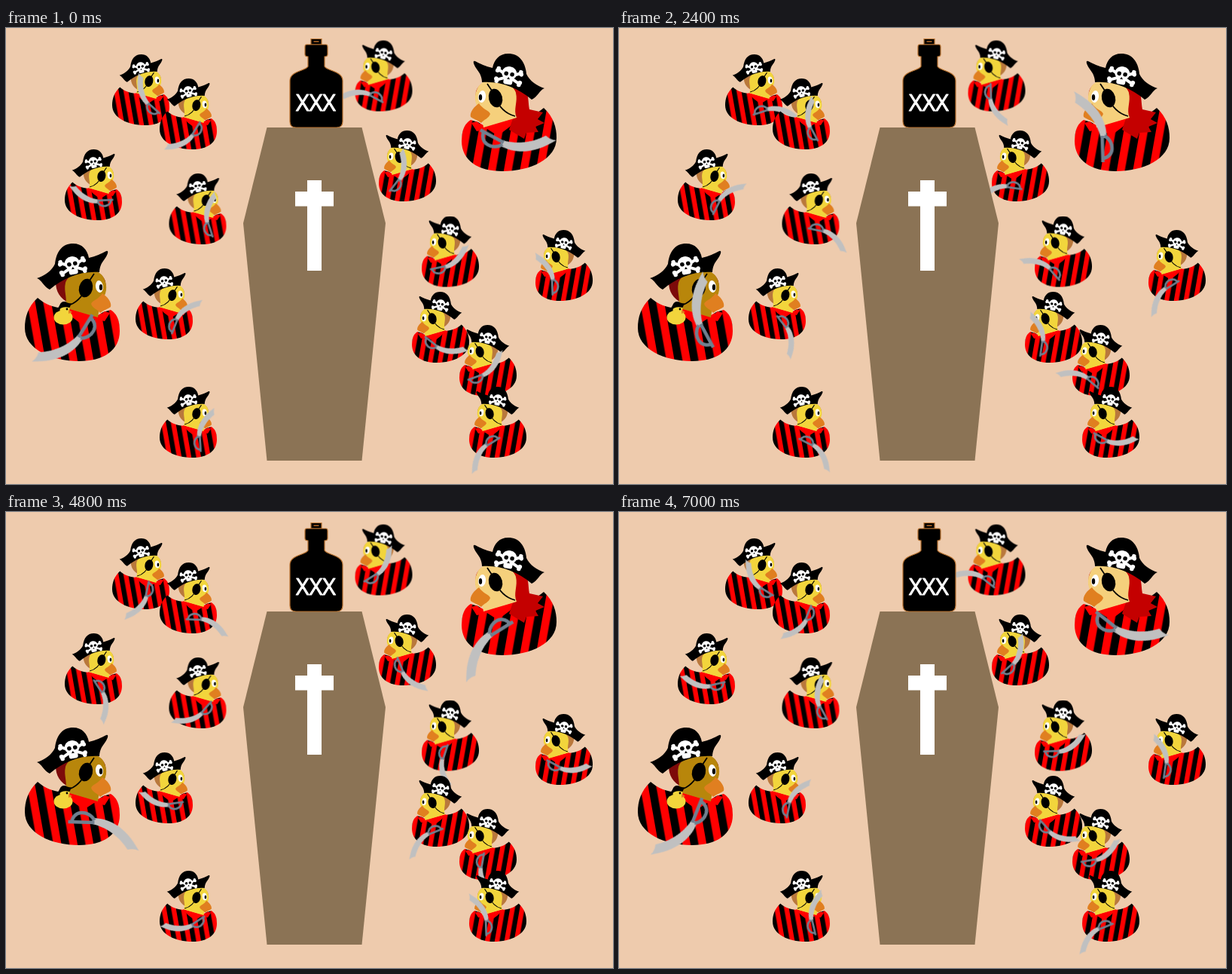
Animation, 806 px wide and 605 px high, one loop 7.2 s. Source, as an HTML page without scripts:

```html
<!DOCTYPE html>
<html lang="en">
<head>
<meta charset="utf-8">
<title>Pirate ducks</title>
<style>
  html, body { margin: 0; width: 100%; height: 100%; overflow: hidden; background: #eecbad; }
  svg { display: block; width: 806px; height: 605px; }
  .crew { --face: #f2d53c; --hair: #b9783c; }
  .mate { --face: #b8860b; --hair: #7d0a0a; }
  .captain { --face: #f5d07c; --hair: #c40000; }
  .face { fill: var(--face); }
  .hair { fill: var(--hair); }
  .spin { animation: spin 7.2s steps(36) infinite; }
  @keyframes spin {
    from { transform: rotate(var(--start)); }
    to { transform: rotate(calc(var(--start) + 360deg)); }
  }
  .label { font: 500 30.5px "Open Sans", "Noto Sans", sans-serif; fill: #fff; stroke: #fff; stroke-linejoin: round; }
</style>
</head>
<body>
<svg viewBox="0 0 806 605">
  <defs>
    <pattern id="stripes" width="21" height="21" patternUnits="userSpaceOnUse" patternTransform="rotate(-10)">
      <rect width="21" height="21" fill="#f00"/>
      <rect width="10.5" height="21"/>
    </pattern>

    <g id="body">
      <path fill="url(#stripes)" d="M17 72C4 84 0 98 0 112C0 140 35 156 72 156C104 156 126 142 126 116C126 98 120 92 114 88L104 91L92 98L52 86C38 85 26 80 17 72Z"/>
      <path fill="#f00" d="M51 84L97 97L106 90L113 92L106 103L92 100L78 109L62 97Z"/>
    </g>

    <g id="head">
      <path class="hair" d="M41 50C40 30 100 26 107 50L108 62L60 80C46 72 41 64 41 50Z"/>
      <path class="face" d="M54 52C60 34 94 28 104 44C111 56 109 68 100 78L97 98L53 85C58 74 51 64 54 52Z"/>
      <path fill="#e07f20" d="M103 66C109 70 116 78 114 84C110 87 105 88 100 92C96 87 90 86 88 80C90 75 98 74 103 66Z"/>
      <ellipse cx="99" cy="57" rx="5" ry="8" fill="#fff" transform="rotate(-8 99 57)"/>
      <ellipse cx="101" cy="58" rx="2.2" ry="4"/>
      <path d="M92 40Q86 48 82 57Q74 78 55 83" fill="none" stroke="#000" stroke-width="1.8"/>
      <ellipse cx="81" cy="59" rx="9" ry="12.5" transform="rotate(14 81 59)"/>
      <path d="M16 46C26 43 36 36 40 27C42 10 50 0 64 0C76 0 83 8 85 19C94 17 102 13 108 10Q111 9 110 13C107 22 100 24 99 38C75 36 52 45 33 61C26 58 22 48 16 46Z"/>
      <g transform="translate(63 28) rotate(-10)">
        <path d="M-14 -4L14 9M-14 9L14 -4" stroke="#fff" stroke-width="4"/>
        <g fill="#fff">
          <circle cx="-15" cy="-6" r="2.8"/><circle cx="-16" cy="-3" r="2.8"/>
          <circle cx="15" cy="-6" r="2.8"/><circle cx="16" cy="-3" r="2.8"/>
          <circle cx="-15" cy="11" r="2.8"/><circle cx="-16" cy="8" r="2.8"/>
          <circle cx="15" cy="11" r="2.8"/><circle cx="16" cy="8" r="2.8"/>
          <ellipse cy="-2" rx="10" ry="9"/>
          <rect x="-6" y="2" width="12" height="11" rx="3"/>
        </g>
        <circle cx="-4" cy="-1" r="2.8"/><circle cx="4" cy="-1" r="2.8"/>
        <path d="M0 3L2 6H-2Z"/>
      </g>
    </g>

    <g id="duck"><use href="#body"/><use href="#head"/></g>

    <g id="sword" transform="rotate(120)">
      <path fill="#c0c0c0" d="M7 1C26 1 50 9 69 44.5Q62 41 54 43C46 30 30 14 7 9Z"/>
      <path fill="none" stroke="#708090" stroke-width="4.5" d="M-25 6L10 7M-20 8C-20 -9 2 -11 10 4"/>
    </g>

    <g id="chick">
      <ellipse cx="51" cy="98" rx="12.5" ry="9.5" fill="#f2d53c"/>
      <circle cx="53" cy="88" r="6.5" fill="#f2d53c"/>
      <path fill="#e07f20" d="M58 88L63 91L58 93Z"/>
      <circle cx="56" cy="87" r="1.4"/>
      <path d="M43 86C47 84 46 77 52 77C56 77 56 80 62 79C60 82 61 84 59 85C53 83 48 85 45 88Z"/>
    </g>
  </defs>

  <rect width="806" height="605" fill="#eecbad"/>

  <g class="mate" transform="translate(25 286)">
    <use href="#duck"/><use href="#chick"/>
    <g transform="translate(82.4 119)"><use class="spin" style="--start:0deg" href="#sword"/></g>
  </g>
  <g class="captain" transform="translate(731 34) scale(-1 1)">
    <use href="#body"/>
    <path class="hair" d="M42 45C36 58 38 66 36 74L18 78L25 87L16 92L28 97L24 104L40 105L43 113L63 101L56 80L60 50Z"/>
    <use href="#head"/>
    <g transform="translate(82.4 119)"><use class="spin" style="--start:30deg" href="#sword"/></g>
  </g>

  <g class="crew">
    <g transform="translate(141 35) scale(.603)">
      <use href="#duck"/>
      <g transform="translate(82.4 119)"><use class="spin" style="--start:100deg" href="#sword"/></g>
    </g>
    <g transform="translate(204 67) scale(.603)">
      <use href="#duck"/>
      <g transform="translate(82.4 119)"><use class="spin" style="--start:0deg" href="#sword"/></g>
    </g>
    <g transform="translate(78 161) scale(.603)">
      <use href="#duck"/>
      <g transform="translate(82.4 119)"><use class="spin" style="--start:55deg" href="#sword"/></g>
    </g>
    <g transform="translate(216.5 193) scale(.603)">
      <use href="#duck"/>
      <g transform="translate(82.4 119)"><use class="spin" style="--start:130deg" href="#sword"/></g>
    </g>
    <g transform="translate(172 319) scale(.603)">
      <use href="#duck"/>
      <g transform="translate(82.4 119)"><use class="spin" style="--start:170deg" href="#sword"/></g>
    </g>
    <g transform="translate(204 476) scale(.603)">
      <use href="#duck"/>
      <g transform="translate(82.4 119)"><use class="spin" style="--start:145deg" href="#sword"/></g>
    </g>

    <g transform="translate(539.5 16.5) scale(-.603 .603)">
      <use href="#duck"/>
      <g transform="translate(82.4 119)"><use class="spin" style="--start:210deg" href="#sword"/></g>
    </g>
    <g transform="translate(571 136) scale(-.603 .603)">
      <use href="#duck"/>
      <g transform="translate(82.4 119)"><use class="spin" style="--start:110deg" href="#sword"/></g>
    </g>
    <g transform="translate(628 249.5) scale(-.603 .603)">
      <use href="#duck"/>
      <g transform="translate(82.4 119)"><use class="spin" style="--start:70deg" href="#sword"/></g>
    </g>
    <g transform="translate(779 268) scale(-.603 .603)">
      <use href="#duck"/>
      <g transform="translate(82.4 119)"><use class="spin" style="--start:150deg" href="#sword"/></g>
    </g>
    <g transform="translate(615 350) scale(-.603 .603)">
      <use href="#duck"/>
      <g transform="translate(82.4 119)"><use class="spin" style="--start:20deg" href="#sword"/></g>
    </g>
    <g transform="translate(678 394) scale(-.603 .603)">
      <use href="#duck"/>
      <g transform="translate(82.4 119)"><use class="spin" style="--start:78deg" href="#sword"/></g>
    </g>
    <g transform="translate(691 476) scale(-.603 .603)">
      <use href="#duck"/>
      <g transform="translate(82.4 119)"><use class="spin" style="--start:270deg" href="#sword"/></g>
    </g>
  </g>

  <path fill="#8b7355" d="M346.5 132H472.5L504 259L472.5 574H346.5L315 259Z"/>
  <path fill="#fff" d="M400 202H419V217H435V236.500H419V322H400V236.500H384V217H400Z"/>

  <g stroke="#b5702f" stroke-width="1.2">
    <path d="M405 22V14.500H419V22Z"/>
    <path d="M399 22H425Q427 22 427 25V35Q427 38 423 38V51C426 57 447 57 447 70V124Q447 132 439 132H385Q377 132 377 124V70C377 57 398 57 401 51V38Q397 38 397 35V25Q397 22 399 22Z"/>
  </g>
  <path d="M408.500 18H415.500" stroke="#8a4f1c" stroke-width="2"/>
  <text class="label" x="411.500" y="109.500" text-anchor="middle">XXX</text>
</svg>
</body>
</html>
```
